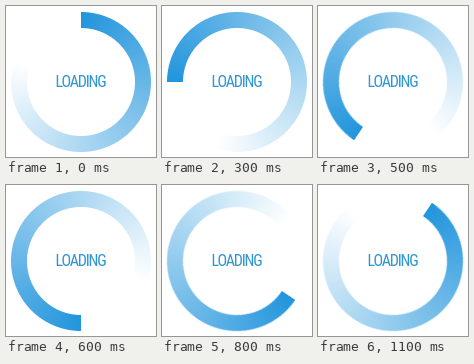
Recreate the animation shown at these times as an HTML page. Size 150 px wide and 151 px high, loop 1.2 s.

```html
<!DOCTYPE html>
<html lang="en">
<head>
<meta charset="utf-8">
<title>Loading</title>
<style>
  html, body {
    margin: 0;
    width: 100%;
    height: 100%;
    overflow: hidden;
    background: #fff;
  }
  .stage {
    position: relative;
    width: 150px;
    height: 151px;
  }
  .ring {
    --band: radial-gradient(circle closest-side at 50% 50%,
      transparent 53.5px, #000 54.5px, #000 69.5px, transparent 70.5px);
    position: absolute;
    left: 4px;
    top: 5px;
    width: 142px;
    height: 142px;
    background: conic-gradient(#2295dc 0deg, #fff 288deg, #fff 360deg);
    -webkit-mask: var(--band);
    mask: var(--band);
    animation: turn 1200ms step-end infinite;
  }
  /* twelve poses, each on the nearest 32nd of a turn */
  @keyframes turn {
    0% { transform: rotate(0deg); }
    8.333% { transform: rotate(-33.75deg); }
    16.666% { transform: rotate(-56.25deg); }
    25% { transform: rotate(-90deg); }
    33.333% { transform: rotate(-123.75deg); }
    41.666% { transform: rotate(-146.25deg); }
    50% { transform: rotate(-180deg); }
    58.333% { transform: rotate(-213.75deg); }
    66.666% { transform: rotate(-236.25deg); }
    75% { transform: rotate(-270deg); }
    83.333% { transform: rotate(-303.75deg); }
    91.666% { transform: rotate(-326.25deg); }
    100% { transform: rotate(-360deg); }
  }
  .label {
    position: absolute;
    left: 0;
    top: 66px;
    width: 149px;
    font: 400 16px/20px "Roboto Condensed", "Open Sans Condensed",
      "Liberation Sans Narrow", Roboto, sans-serif;
    letter-spacing: -1.2px;
    text-align: center;
    color: #2f95d3;
  }
</style>
</head>
<body>
<div class="stage">
  <div class="ring"></div>
  <div class="label">LOADING</div>
</div>
</body>
</html>
```
